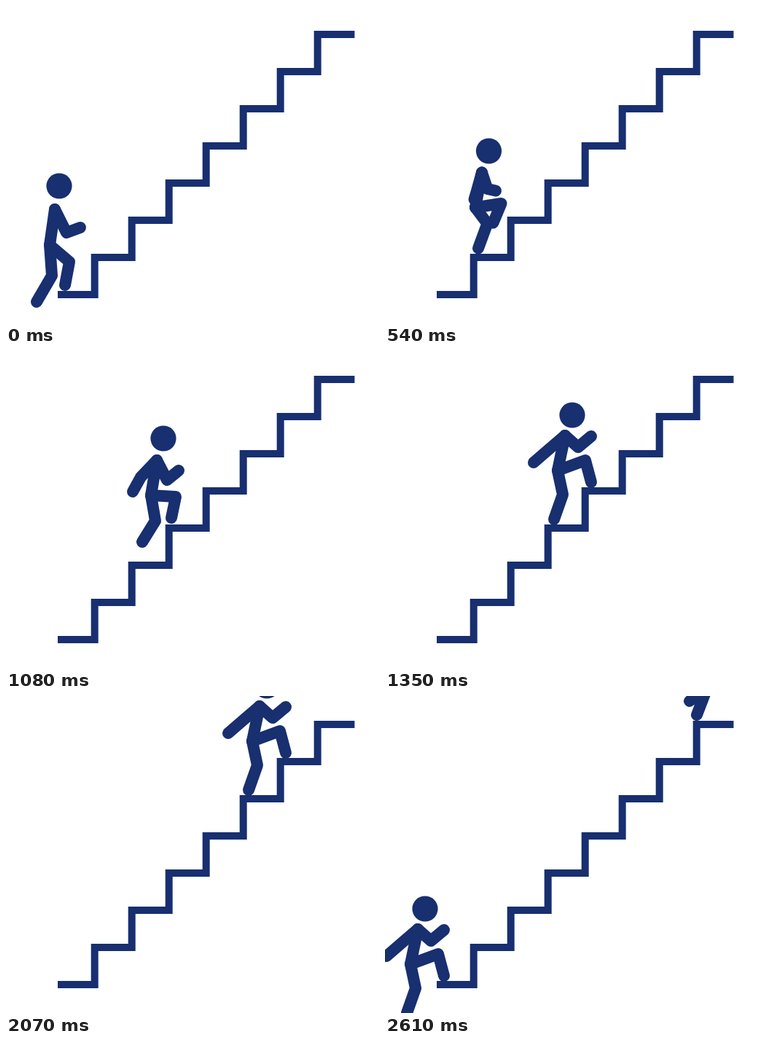
Write an HTML page with a canvas that moves like this. It is 512x435 px and loops after 2700 ms.

```html
<!DOCTYPE html>
<html lang="en">
<head>
<meta charset="utf-8">
<title>Climbing stairs</title>
<style>
  html, body { margin: 0; height: 100%; overflow: hidden; background: #fff; }
  canvas { display: block; width: 100vw; height: 100vh; }
</style>
</head>
<body>
<canvas width="512" height="435"></canvas>
<script>
const ctx = document.querySelector('canvas').getContext('2d');
const NAVY = '#182f70';
const TICK = 90, TICKS = 30, CYCLE = 8;
const STRIDE = { x: 101, y: -102 }; // travel per walk cycle (two steps)

// x,y pairs: head, neck, hip, knee A, foot A, knee B, foot B, elbow A, hand A, elbow B, hand B.
// Arms lying along the torso are left out.
const poses = [
  [55,292, 45,320, 35,368, 73,354, 81,384, 42,401, 30,435, 63,336, 81,321, 24,338, 2,357],
  [73,247, 67,279, 60,328, 87,351, 81,383, 63,370, 42,406, 83,311, 102,304],
  [95,238, 87,268, 80,314, 82,350, 83,383, 105,344, 72,367],
  [102,239, 93,268, 84,316, 90,349, 82,383, 113,324, 101,350, 73,292, 56,306, 98,298, 112,288],
  [106,241, 96,269, 86,317, 93,349, 81,383, 124,303, 127,331, 68,286, 65,309, 119,283, 136,264],
  [115,222, 106,252, 98,300, 104,335, 86,364, 132,302, 126,331, 84,275, 73,295, 120,279, 136,266],
  [129,208, 120,239, 112,287, 145,290, 115,313, 138,298, 125,332, 117,268, 122,288, 128,268, 142,276]
];
// The last pose lies halfway to the start of the next cycle.
poses.push(poses[6].map((v, i) => (v + poses[0][i] + (i % 2 ? STRIDE.y : STRIDE.x)) / 2));

function drawStairs() {
  ctx.lineWidth = 10;
  ctx.lineCap = 'butt';
  ctx.lineJoin = 'miter';
  ctx.beginPath();
  ctx.moveTo(71, 396);
  for (let i = 0; i < 7; i++) {
    const x = 121.7 + i * 51, y = 396 - i * 51;
    ctx.lineTo(x, y);
    ctx.lineTo(x, y - 51);
  }
  ctx.lineTo(478.5, 39);
  ctx.stroke();
}

function drawClimber(tick) {
  const pose = poses[tick % CYCLE], cycle = Math.floor(tick / CYCLE);
  const points = [];
  for (let i = 0; i < pose.length; i += 2)
    points.push([pose[i] + cycle * STRIDE.x, pose[i + 1] + cycle * STRIDE.y]);
  const [head, neck, hip, kneeA, footA, kneeB, footB, elbowA, handA, elbowB, handB] = points;

  ctx.lineWidth = 16;
  ctx.lineCap = ctx.lineJoin = 'round';
  const limb = (...joints) => {
    ctx.beginPath();
    joints.forEach(p => ctx.lineTo(...p));
    ctx.stroke();
  };
  limb(neck, hip);
  limb(hip, kneeA, footA);
  limb(hip, kneeB, footB);
  if (handA) limb(neck, elbowA, handA);
  if (handB) limb(neck, elbowB, handB);

  ctx.beginPath();
  ctx.arc(...head, 17.6, 0, Math.PI * 2);
  ctx.fill();
}

function render(now) {
  const tick = Math.floor(now / TICK) % TICKS + 1;
  ctx.clearRect(0, 0, 512, 435);
  ctx.strokeStyle = ctx.fillStyle = NAVY;
  drawStairs();
  drawClimber(tick);
  if (tick === TICKS) drawClimber(0); // the next climber sets off
}

let start;
function loop(now) {
  start ??= now;
  render(now - start);
  requestAnimationFrame(loop);
}
render(0);
requestAnimationFrame(loop);
</script>
</body>
</html>
```
